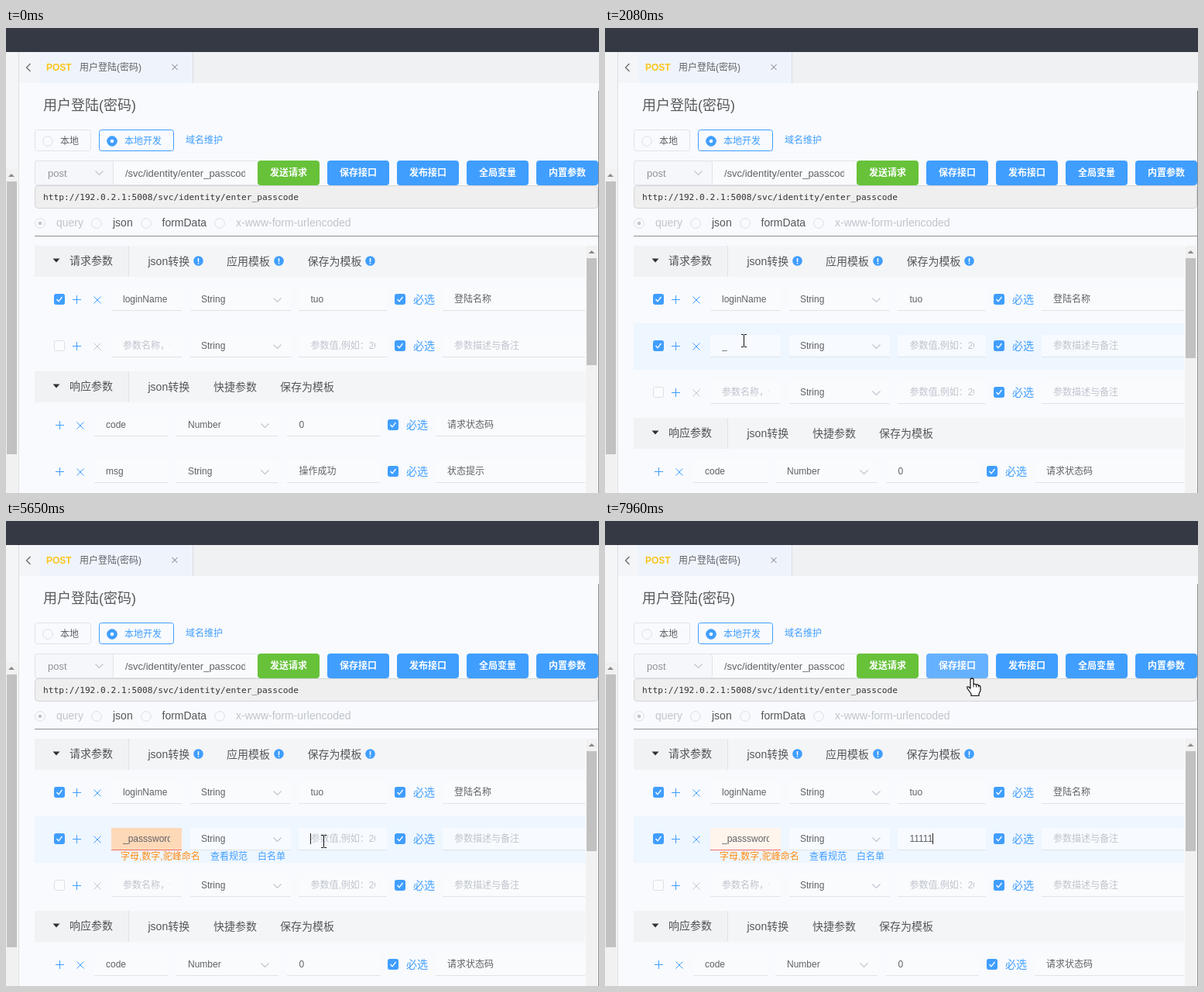
An HTML page with a canvas for the animation above (7990 ms loop, 766 by 600 pixels).

```html
<!DOCTYPE html>
<html lang="zh">
<head>
<meta charset="utf-8">
<style>
html, body { margin: 0; width: 100%; height: 100%; overflow: hidden; background: #f8fafd; }
canvas { display: block; }
</style>
</head>
<body>
<canvas id="stage" width="766" height="600"></canvas>
<script>
const ctx = document.getElementById('stage').getContext('2d');
const LOOP = 7990;
const SANS = '"Liberation Sans", "Noto Sans CJK SC", "Noto Sans CJK", sans-serif';
const MONO = '"DejaVu Sans Mono", monospace';
const BLUE = '#409eff', TEXT = '#606266', PALE = '#c0c4cc', LINE = '#e0e3e9', PAGE = '#f8fafd';
const PATH = '/svc/identity/enter_passcode';
const BUTTONS = ['发送请求', '保存接口', '发布接口', '全局变量', '内置参数'];

const REQUEST = { check: 62, plus: 92, cross: 118, name: 136, nameEnd: 227, type: 238, typeEnd: 368,
  value: 378, valueEnd: 492, must: 502, desc: 564 };
const RESPONSE = { plus: 70, cross: 96, name: 114, nameEnd: 210, type: 220, typeEnd: 352,
  value: 363, valueEnd: 483, must: 493, desc: 555 };

// Typing: moments at which each character lands.
const NAME = { text: '_passsword', at: [1390, 2350, 2650, 2710, 2890, 3130, 3190, 3490, 3670, 3760] };
const VALUE = { text: '11111', at: [6190, 6310, 6430, 6550, 6640] };
const CARET_ON = [[700, 1150], [1390, 1920], [2350, 3970], [4480, 5000], [5200, 5940], [6190, 7120], [7650, LOOP]];
const BLUR = 5200;

// Pointer moves: start, end, from, control, to.
const MOVES = [
  [100, 700, [765, 90], [245, 250], [179, 403]],
  [4480, 4480, [179, 403], [179, 403], [212, 410]],
  [4870, 5230, [212, 410], [310, 409], [410, 413]],
  [6190, 6490, [410, 413], [510, 440], [611, 419]],
  [7570, 7960, [611, 419], [560, 300], [474, 203]]
];

const ramp = (t, a, b) => b > a ? Math.min(1, Math.max(0, (t - a) / (b - a))) : +(t >= a);
const typed = (field, t) => field.text.slice(0, field.at.filter(a => a <= t).length);
const inside = (p, x, y, w, h) => p && p[0] >= x && p[0] < x + w && p[1] >= y && p[1] < y + h;

function mix(a, b, k) {
  return `rgb(${a.map((v, i) => Math.round(v + (b[i] - v) * k))})`;
}

function rect(x, y, w, h, fill) {
  ctx.fillStyle = fill;
  ctx.fillRect(x, y, w, h);
}

function box(x, y, w, h, fill, edge, r = 3) {
  ctx.beginPath();
  ctx.roundRect(x + .5, y + .5, w - 1, h - 1, r);
  ctx.fillStyle = fill;
  ctx.fill();
  ctx.lineWidth = 1;
  ctx.strokeStyle = edge;
  ctx.stroke();
}

function poly(points, color, width = 1) {
  ctx.beginPath();
  points.forEach(([x, y]) => ctx.lineTo(x, y));
  ctx.lineWidth = width;
  ctx.strokeStyle = color;
  ctx.stroke();
}

function triangle(x, y, w, h, color) {
  ctx.beginPath();
  ctx.moveTo(x - w, y - h);
  ctx.lineTo(x + w, y - h);
  ctx.lineTo(x, y + h);
  ctx.fillStyle = color;
  ctx.fill();
}

function disc(x, y, r, fill, edge) {
  ctx.beginPath();
  ctx.arc(x, y, r, 0, 7);
  ctx.fillStyle = fill;
  ctx.fill();
  if (edge) {
    ctx.lineWidth = 1;
    ctx.strokeStyle = edge;
    ctx.stroke();
  }
}

// y is the vertical middle of the line of text.
function label(s, x, y, size = 12, color = TEXT, weight = '', family = SANS) {
  ctx.font = `${weight} ${size}px ${family}`;
  ctx.fillStyle = color;
  ctx.fillText(s, x, Math.round(y + size * .36));
}

function clipped(x, y, w, h, draw) {
  ctx.save();
  ctx.beginPath();
  ctx.rect(x, y, w, h);
  ctx.clip();
  draw();
  ctx.restore();
}

function chevron(x, y) {
  poly([[x - 5, y - 2.5], [x, y + 2.5], [x + 5, y - 2.5]], PALE, 1.1);
}

function cross(x, y, r, color) {
  poly([[x - r, y - r], [x + r, y + r]], color);
  poly([[x - r, y + r], [x + r, y - r]], color);
}

function plus(x, y) {
  rect(x - 6, y, 11, 1, BLUE);
  rect(x - 1, y - 5, 1, 11, BLUE);
}

function checkbox(x, y, k = 1) {
  box(x, y - 7, 14, 14, '#fbfcfe', '#dcdfe6', 2);
  if (!k) return;
  ctx.globalAlpha = k;
  box(x, y - 7, 14, 14, BLUE, BLUE, 2);
  poly([[x + 3.5, y], [x + 6, y + 2.8], [x + 10.5, y - 3]], '#fff', 1.3);
  ctx.globalAlpha = 1;
}

function radio(x, y, color, dot) {
  disc(x, y, 6.3, dot === 'on' ? BLUE : PAGE, color);
  if (dot) disc(x, y, 2.3, dot === 'on' ? '#fff' : PALE);
}

function field(x, end, y, fill, edge = LINE) {
  rect(x, y - 14, end - x, 28, fill);
  rect(x, y + 14, end - x, 1, edge);
}

function caret(x, y) {
  rect(Math.round(x), y - 7, 1, 14, '#222');
}

function row(c, y, o) {
  const on = o.on ?? 1;
  if (o.lit) rect(37, y - 29, 711, 60, '#eef6ff');
  const fill = o.lit ? '#f7fafe' : '#f9fbfd';
  if (c.check) checkbox(c.check, y, on);
  plus(c.plus, y);
  cross(c.cross, y + 1, 4.5, mix([192, 196, 204], [64, 158, 255], on));

  field(c.name, c.nameEnd, y, o.nameFill || fill, o.nameEdge);
  clipped(c.name + 15, y - 14, c.nameEnd - c.name - 30, 28, () => {
    if (!o.name) label('参数名称，例如：age name job', c.name + 15, y, 12, PALE);
    else label(o.name, c.name + 15 - (o.scroll || 0), y);
  });

  field(c.type, c.typeEnd, y, fill);
  label(o.type || 'String', c.type + 15 - (c.check ? 1 : 0), y);
  chevron(c.typeEnd - 17.5, y + 1);

  field(c.value, c.valueEnd, y, fill);
  clipped(c.value + 15, y - 14, c.valueEnd - c.value - 30, 28, () => {
    label(o.value || '参数值,例如：20 job', c.value + 15.5, y, 12, o.value ? TEXT : PALE);
  });

  checkbox(c.must, y);
  label('必选', c.must + 24, y, 14, BLUE);
  field(c.desc, 748, y, fill);
  label(o.desc || '参数描述与备注', c.desc + 15, y, 12, o.desc ? TEXT : PALE);
}

function section(y, title, items, info) {
  rect(37, y - 20, 711, 40, '#f4f5f6');
  rect(37, y - 20, 121, 40, '#f1f2f3');
  rect(158, y - 20, 1, 40, '#dfe1e4');
  triangle(65, y - 1, 4.5, 2.5, '#303133');
  label(title, 82, y - 1, 14, '#505256');
  items.forEach(([s, x, icon]) => {
    label(s, x, y, 14, '#55575b');
    if (!info) return;
    disc(icon, y - .5, 6.3, BLUE);
    rect(icon - .75, y - 4, 1.5, 5, '#fff');
    rect(icon - .75, y + 2, 1.5, 1.5, '#fff');
  });
}

function chrome() {
  rect(0, 0, 766, 600, PAGE);
  rect(0, 0, 766, 31, '#353943');

  // left panel and its scrollbar
  rect(0, 31, 17, 569, '#f4f5f6');
  rect(0, 182, 15, 418, '#f1f1f1');
  rect(1, 198, 13, 352, '#c1c1c1');
  triangle(7, 190, 4, -2, '#8a8a8a');
  rect(16, 31, 1, 569, '#dcdee2');

  // tabs
  rect(17, 31, 749, 40, '#f0f1f2');
  rect(17, 31, 26, 40, '#f3f5f8');
  rect(43, 31, 198, 40, '#eff4fc');
  rect(241, 31, 1, 40, '#d8dce5');
  poly([[31.5, 46], [26.5, 51], [31.5, 56]], '#666', 1.2);
  label('POST', 52, 51, 12, '#fbc41c', 'bold');
  label('用户登陆(密码)', 95, 51);
  cross(218, 50.5, 3.5, '#777');

  label('用户登陆(密码)', 48, 100, 18, '#58595c');
  rect(765, 81, 1, 519, '#8c8f94');

  box(37, 131, 73, 28, PAGE, LINE);
  radio(54, 146, '#dcdfe6');
  label('本地', 70, 146);
  box(120, 131, 97, 28, PAGE, BLUE);
  radio(137, 146, BLUE, 'on');
  label('本地开发', 153, 146, 12, BLUE);
  label('域名维护', 232, 145, 12, BLUE);
}

function requestBar(p) {
  box(37, 171, 290, 32, '#fafbfd', LINE);
  box(37, 171, 102, 32, '#f5f7fa', LINE);
  label('post', 54, 187, 13, '#909399');
  chevron(120.5, 187);
  clipped(154, 172, 155, 30, () => label(PATH, 154, 187, 13));

  ctx.textAlign = 'center';
  BUTTONS.forEach((s, i) => {
    const x = 325 + i * 90, hot = inside(p, x, 171, 80, 33);
    const fill = i ? (hot ? '#66b1ff' : BLUE) : (hot ? '#85ce61' : '#67c23a');
    box(x, 171, 80, 32, fill, fill);
    label(s, x + 40, 187, 12, '#fff', 'bold');
  });
  ctx.textAlign = 'left';

  box(37, 203, 728, 30, '#efefef', '#d2d4d6', 4);
  label('http://192.0.2.1:5008' + PATH, 48, 218, 11.2, '#333', '', MONO);

  radio(44, 252, '#dcdfe6', 'off');
  label('query', 65, 251, 14, PALE);
  [117, 181, 276].forEach(x => radio(x, 252, '#dcdfe6'));
  label('json', 138, 251, 14, '#55575b');
  label('formData', 201.5, 251, 14, '#55575b');
  label('x-www-form-urlencoded', 297, 251, 14, PALE);
  rect(37, 268, 728, 1, '#8e9094');
}

function width(s) {
  ctx.font = `12px ${SANS}`;
  return ctx.measureText(s).width;
}

function table(t, p) {
  const name = typed(NAME, t), value = typed(VALUE, t);
  const grown = name !== '', blurred = t >= BLUR;
  const shift = grown ? 60 : 0;
  const nameWidth = width(name);
  const scroll = blurred ? 0 : Math.max(0, nameWidth + 1 - 61);

  section(301, '请求参数', [['json转换', 183.5, 248.5], ['应用模板', 285, 352.5], ['保存为模板', 389.5, 470.5]], true);
  row(REQUEST, 350, { name: 'loginName', value: 'tuo', desc: '登陆名称', lit: inside(p, 37, 321, 711, 60) });

  const editing = { name, value, scroll, on: ramp(t, 1840, 2080),
    lit: t >= 700 || inside(p, 37, 381, 711, 60) };
  if (blurred) {
    editing.nameFill = mix([254, 217, 184], [255, 245, 237], ramp(t, 5890, 5980));
    editing.nameEdge = mix([224, 227, 233], [245, 108, 108], ramp(t, 5530, 5650));
  }
  row(REQUEST, 410, editing);
  if (blurred) {
    label('字母,数字,驼峰命名', 148, 433, 12, '#ff8a0f');
    label('查看规范', 264, 433, 12, BLUE);
    label('白名单', 325, 433, 12, BLUE);
  }
  if (CARET_ON.some(([a, b]) => t >= a && t < b)) {
    if (blurred) caret(393 + width(value), 410);
    else caret(151 + nameWidth - scroll, 410);
  }

  if (grown) row(REQUEST, 470, { on: 0 });
  section(463 + shift, '响应参数', [['json转换', 183.5], ['快捷参数', 268], ['保存为模板', 354]]);
  row(RESPONSE, 512 + shift, { name: 'code', type: 'Number', value: '0', desc: '请求状态码' });
  row(RESPONSE, 572 + shift, { name: 'msg', value: '操作成功', desc: '状态提示' });

  rect(749, 281, 15, 319, '#f1f1f1');
  rect(750, 297, 13, grown ? 129 : 138, '#c1c1c1');
  triangle(756.5, 289, 4, -2, '#8a8a8a');
}

function tooltip() {
  rect(187, 417, 191, 25, '#4a4a4a');
  rect(188, 418, 189, 23, '#fff');
  label('参数名称，例如：', 195, 430, 12, '#444');
  label('age name job', 291, 430, 12.2, '#444', '', '"Noto Sans", sans-serif');
}

function pointer(t) {
  const move = MOVES.filter(m => m[0] <= t).pop();
  if (!move) return null;
  const [start, end, a, c, b] = move;
  const k = ramp(t, start, end), e = k * k * (3 - 2 * k), u = 1 - e;
  return a.map((v, i) => Math.round(u * u * v + 2 * u * e * c[i] + e * e * b[i]));
}

const ARROW = new Path2D('M0 0V16L3.8 12.5L6.3 18.5L8.8 17.4L6.3 11.6H11.5Z');
const HAND = new Path2D('M-2 1Q0-1 2 1V8Q4 6.5 5.5 8.5Q7.5 7 8.7 9.5Q11 9 11 11.5V16L9 20V22.5H-1V20L-6 13Q-7 10 -4.3 11L-2 13Z');

function drawPointer(p) {
  if (!p) return;
  const [x, y] = p;
  const overButton = y >= 171 && y < 204 && BUTTONS.some((s, i) => inside(p, 325 + i * 90, 171, 80, 33));
  const overField = y > 321 && y < 441 && (y - 321) % 60 > 14 &&
    [['name', 'nameEnd'], ['value', 'valueEnd'], ['desc']].some(([a, b]) => x >= REQUEST[a] && x < (REQUEST[b] || 748));
  ctx.save();
  ctx.translate(x, y);
  if (overField) {
    rect(0, -7, 1, 15, '#111');
    [-8, 8].forEach(d => {
      rect(-3, d, 3, 1, '#111');
      rect(1, d, 3, 1, '#111');
    });
  } else {
    const shape = overButton ? HAND : ARROW;
    ctx.fillStyle = '#fff';
    ctx.fill(shape);
    ctx.lineWidth = 1.2;
    ctx.lineJoin = 'round';
    ctx.strokeStyle = '#111';
    ctx.stroke(shape);
    if (overButton) [2, 5.5, 8.7].forEach(v => poly([[v, 8.5], [v, 11.5]], '#111'));
  }
  ctx.restore();
}

function render(t) {
  const p = pointer(t);
  chrome();
  requestBar(p);
  table(t, p);
  if (t >= 970 && t < 1165) tooltip();
  drawPointer(p);
}

const origin = performance.now();
function tick() {
  render((performance.now() - origin) % LOOP);
  requestAnimationFrame(tick);
}
tick();
</script>
</body>
</html>
```
